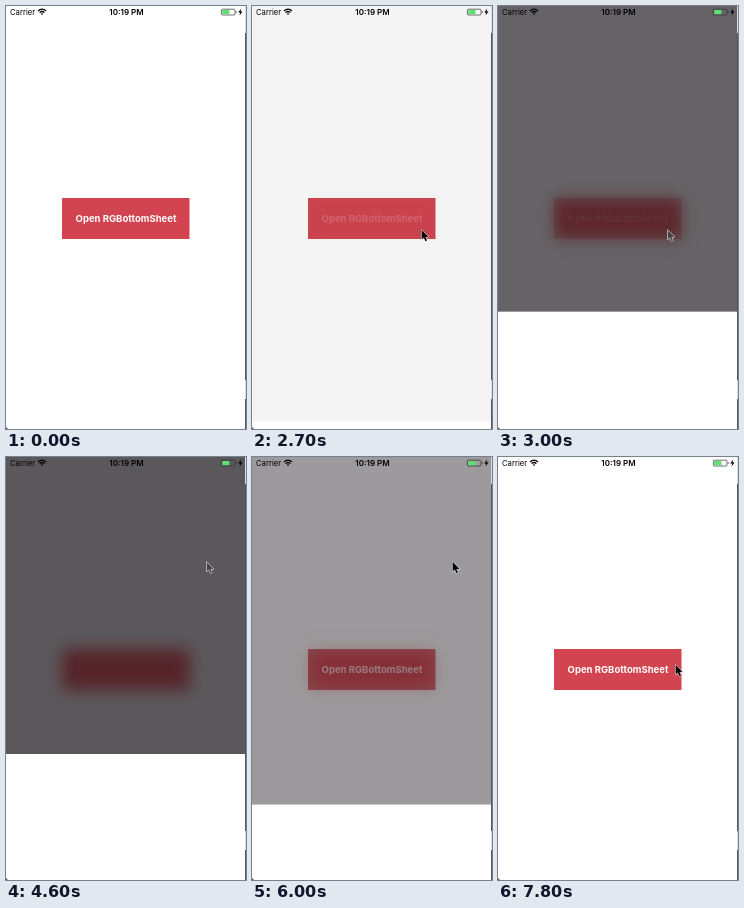
Animation, 240 px wide and 423 px high, one loop 8 s. Source, as an HTML page:

```html
<!DOCTYPE html>
<html lang="en">
<head>
<meta charset="utf-8">
<title>Bottom sheet</title>
<style>
  html, body { margin: 0; width: 100%; height: 100%; overflow: hidden; background: #fff; }
  svg { display: block; width: 240px; height: 423px; }
  text { font-family: Inter, "Liberation Sans", sans-serif; }
  .carrier { font-size: 7.7px; }
  .clock { font-size: 8px; font-weight: 600; text-anchor: middle; }
  .title { font-size: 9.5px; font-weight: 700; text-anchor: middle; fill: #fff; }
</style>
</head>
<body>
<svg viewBox="0 0 240 423">
  <defs>
    <filter id="soft" filterUnits="userSpaceOnUse" x="0" y="130" width="240" height="165" color-interpolation-filters="sRGB">
      <feGaussianBlur stdDeviation="8"/>
    </filter>
  </defs>
  <rect width="240" height="423" fill="#fff"/>

  <rect x="56" y="192" width="127.5" height="41" fill="#d2444f"/>
  <text class="title" id="title" x="120" y="216">Open RGBottomSheet</text>

  <g id="dim" opacity="0">
    <rect width="239" height="423" fill="#5b585b"/>
    <rect x="56" y="192" width="128" height="41" fill="#55242a" filter="url(#soft)"/>
  </g>
  <rect id="sheet" y="423" width="239" height="127" fill="#fff"/>

  <g id="status">
    <text class="carrier" x="4" y="8.6">Carrier</text>
    <g fill="none" stroke="#000" stroke-width="1.2">
      <path d="M32 5 Q36 1.2 40 5"/>
      <path d="M33.6 6.6 Q36 4.4 38.4 6.6"/>
    </g>
    <path d="M34.7 7.7 Q36 6.6 37.3 7.7 L36 9Z"/>
    <text class="clock" x="120.5" y="8.7">10:19 PM</text>
    <rect x="215.4" y="3.2" width="13.6" height="5.8" rx="1" fill="none" stroke="#333" stroke-width=".7"/>
    <rect x="216.2" y="4" width="7.2" height="4.2" fill="#5fe071"/>
    <path d="M229.8 5 h.5 q.6 1 0 2 h-.5Z" fill="#333"/>
    <path d="M235.2 2.6 L232.2 6.4 H234.2 L233.4 9.4 L236.6 5.4 H234.6Z"/>
  </g>

  <!-- window edge -->
  <rect x="239" width="1" height="423" fill="#dedede"/>
  <path d="M239 27h1v347h-1zM239 393h1v30h-1z" fill="#55555a"/>
  <path d="M0 421v2h2z" fill="#555"/>

  <path id="cursor" d="M.6 .8V10.6L2.8 8.6L4.4 12.2L6 11.5L4.5 8H7.5Z"
        stroke="#fff" stroke-width="1" stroke-linejoin="round" paint-order="stroke" visibility="hidden"/>
</svg>
<script>
  const LOOP = 8000, STEP = 100, SHEET = 126;
  const el = id => document.getElementById(id);
  const [title, dim, sheet, cursor] = ['title', 'dim', 'sheet', 'cursor'].map(el);
  const clamp = v => Math.min(1, Math.max(0, v));
  const smooth = v => v * v * (3 - 2 * v);

  // cursor stops: time, x, y
  const stops = [
    [200, 72, 390], [400, 175, 211], [500, 126, 305], [600, 126, 305],
    [1500, 165, 227], [1800, 169, 223], [3900, 169, 223], [4600, 200, 104],
    [6600, 200, 104], [7500, 175, 199], [7800, 177, 207], [8000, 177, 207]
  ];

  function cursorAt(t) {
    const i = stops.findIndex(s => s[0] > t);
    const [t0, x0, y0] = stops[i - 1], [t1, x1, y1] = stops[i];
    const k = smooth((t - t0) / (t1 - t0));
    return [x0 + (x1 - x0) * k, y0 + (y1 - y0) * k];
  }

  // critically damped spring in, ease-in-out back
  function openness(t) {
    if (t >= 5705) return 1 - smooth(clamp((t - 5705) / 680));
    const s = Math.max(0, t - 2670) * 0.0132;
    return 1 - (1 + s) * Math.exp(-s);
  }

  function draw(t) {
    const p = openness(t);
    dim.setAttribute('opacity', p);
    sheet.setAttribute('y', 423 - SHEET * p);
    title.setAttribute('opacity', t >= 2400 && t < 2900 ? 0.2 : 1);

    const shown = t >= stops[0][0];
    cursor.setAttribute('visibility', shown ? 'visible' : 'hidden');
    if (!shown) return;
    const [x, y] = cursorAt(t);
    cursor.setAttribute('transform', `translate(${x} ${y})`);
    cursor.setAttribute('fill', p > 0.8 ? '#444' : '#000');
  }

  const start = performance.now();
  function tick() {
    const t = (performance.now() - start) % LOOP;
    draw(Math.floor(t / STEP) * STEP);
    requestAnimationFrame(tick);
  }
  tick();
</script>
</body>
</html>
```
